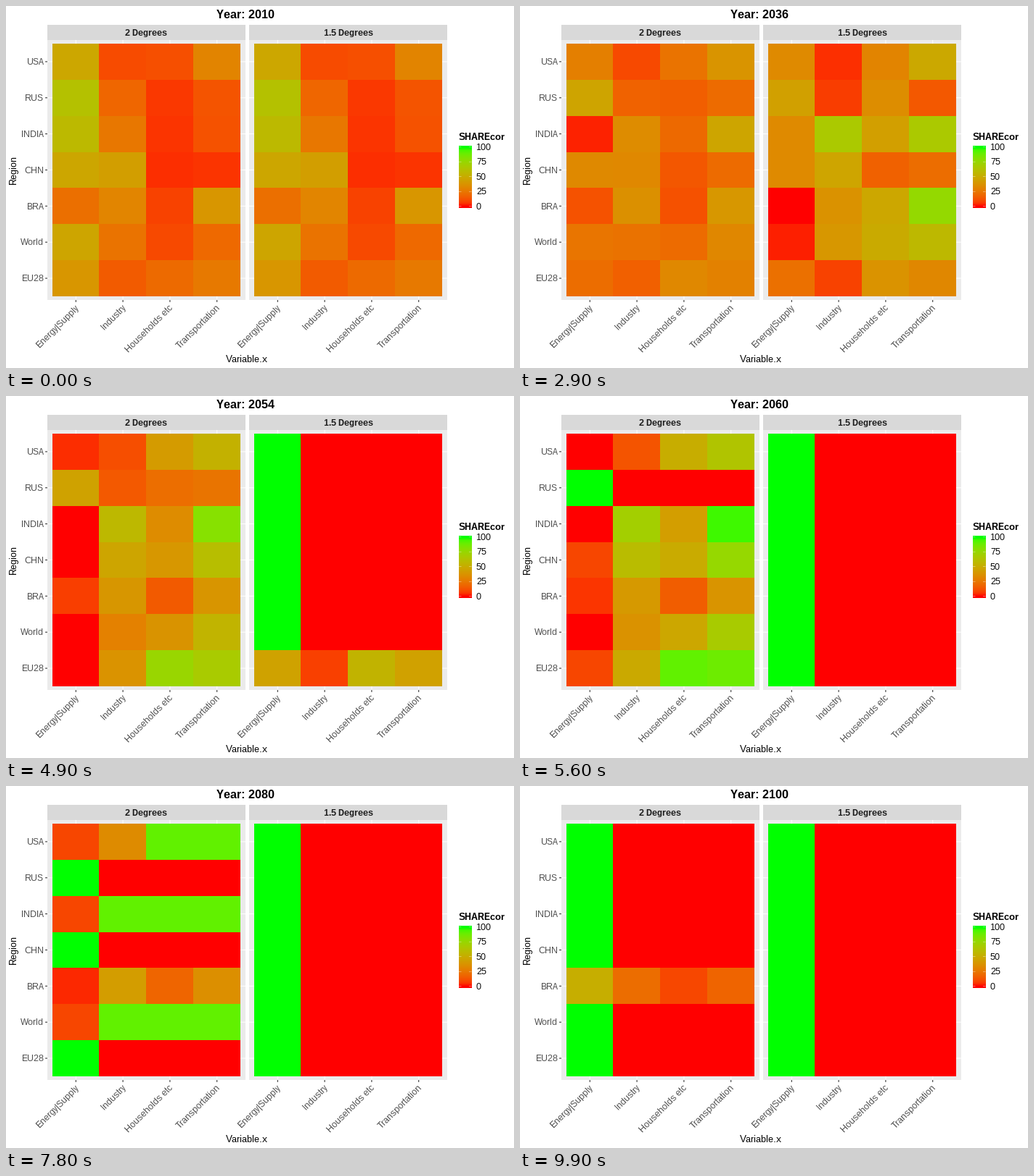
Recreate the animation shown at these times as a matplotlib script. Size 700 px wide and 500 px high, loop 10 s.

```python
import numpy as np
import matplotlib.pyplot as plt
from matplotlib.animation import FuncAnimation
from matplotlib.patches import Rectangle

W, H, DPI = 700, 500, 100
FRAMES, INTERVAL = 100, 100
PX = 72 / DPI  # points per pixel

plt.rcParams.update({
    "font.family": "Liberation Sans",
    "text.hinting": "default",
    "text.hinting_factor": 1,
    "text.kerning_factor": 6,
})

SECTORS = ["Energy|Supply", "Industry", "Households etc", "Transportation"]
PANEL_X = {"2 Degrees": 57, "1.5 Degrees": 335}
COL_W, ROW_H = 64.8, 49.86
ROW_EDGES = np.round(52 + ROW_H * np.arange(8))
ROW_MID = 76.9 + ROW_H * np.arange(7)

# Years with data and where they fall on the time line
YEARS = [*range(2010, 2050, 5), *range(2050, 2101, 10)]
KEYS = [0, 5, 11, 16, 22, 27, 33, 39, 44, *range(55, 100, 11)]

# Sector shares in 2010
START = {
    "USA": (47, 10, 11, 30),
    "RUS": (63, 19, 6, 13),
    "INDIA": (57, 25, 5, 12),
    "CHN": (47, 43, 4, 5),
    "BRA": (22, 31, 8, 39),
    "World": (48, 24, 10, 20),
    "EU28": (39, 15, 20, 26),
}
# Year of carbon-neutral supply, curve power, then the industry and
# household parts of demand in that year (and a late rebound of supply)
PATHS = {
    "2 Degrees": {
        "USA": (2053, 1.2, 0.10, 0.40),
        "RUS": (2049, 2, 0.24, 0.36),
        "INDIA": (2036.4, 0.5, 0.33, 0.20),
        "CHN": (2050, 2, 0.32, 0.27),
        "BRA": (2080, 0.7, 0.44, 0.19, 1.13),
        "World": (2049, 1.2, 0.24, 0.31),
        "EU28": (2045.5, 2, 0.20, 0.44),
    },
    "1.5 Degrees": {
        "USA": (2033.4, 3, 0.05, 0.37),
        "RUS": (2043.8, 3, 0.03, 0.74),
        "INDIA": (2032, 3, 0.38, 0.24),
        "CHN": (2033.3, 3, 0.55, 0.20),
        "BRA": (2030.5, 3, 0.22, 0.28),
        "World": (2035.3, 3, 0.27, 0.34),
        "EU28": (2043, 3, 0.07, 0.52),
    },
}


def shares(year, start, neutral, power, industry, homes, rebound=0):
    """Sector shares of net emissions; all supply once the net is negative."""
    supply, demand = start[0], np.array(start[1:])
    x = (year - 2010) / (neutral - 2010)
    ratio = supply / demand.sum() * (1 - x ** power)
    ratio += rebound * max(0, (year - 2080) / 20)
    if ratio <= -1:
        return np.array([100, 0, 0, 0])
    first = demand / demand.sum()
    last = np.array([industry, homes, 1 - industry - homes])
    mix = first + (last - first) * min(x, 1)
    return np.clip(100 * np.array([ratio, *mix]) / (1 + ratio), 0, 100)


def ramp(share):
    """Red to green through CIE Lab for shares of 0..100."""
    t = np.asarray(share, float)[..., None] / 100
    lab = (1 - t) * [53.24, 80.09, 67.20] + t * [87.73, -86.18, 83.18]
    fy = (lab[..., 0] + 16) / 116
    f = np.stack([fy + lab[..., 1] / 500, fy, fy - lab[..., 2] / 200], -1)
    xyz = np.where(f > 6 / 29, f ** 3, (f - 4 / 29) * 0.12842)
    xyz = xyz * [0.95047, 1, 1.08883]
    to_rgb = np.array([[3.2406, -1.5372, -0.4986],
                       [-0.9689, 1.8758, 0.0415],
                       [0.0557, -0.2040, 1.0570]])
    lin = np.clip(xyz @ to_rgb.T, 0, 1)
    rgb = np.where(lin > 0.0031308, 1.055 * lin ** (1 / 2.4) - 0.055, 12.92 * lin)
    return np.clip(rgb, 0, 1)


TABLES = {panel: np.array([[shares(y, START[r], *path) for r, path in paths.items()]
                           for y in YEARS])
          for panel, paths in PATHS.items()}


def tiles(panel, i):
    """Tile colours, moving linearly between the data years."""
    k = min(np.searchsorted(KEYS, i, side="right") - 1, len(KEYS) - 2)
    t = (i - KEYS[k]) / (KEYS[k + 1] - KEYS[k])
    table = TABLES[panel]
    return ramp(table[k] + (table[k + 1] - table[k]) * t)


fig = plt.figure(figsize=(W / DPI, H / DPI), dpi=DPI, facecolor="white")
ax = fig.add_axes([0, 0, 1, 1])
ax.axis("off")


def box(x, y, w, h, color):
    ax.add_patch(Rectangle((x, y), w, h, fc=color, lw=0, antialiased=False))


def line(x0, y0, x1, y1, color, width=1.07, z=2):
    ax.plot([x0, x1], [y0, y1], color=color, lw=width * PX,
            solid_capstyle="butt", snap=False, zorder=z)


def label(x, y, s, size=12, color="black", **kw):
    kw.setdefault("va", "baseline")
    return ax.text(x, y, s, fontsize=size * PX, color=color, **kw)


# Panels
meshes = {}
for panel, x in PANEL_X.items():
    box(x, 26, 273, 21, "#D9D9D9")
    box(x, 47, 273, 359, "#EBEBEB")
    label(x + 136.5, 41, panel, color="#1A1A1A", weight="bold", ha="center")
    for y in ROW_MID:
        line(x, y, x + 273, y, "white")
    for k, name in enumerate(SECTORS):
        cx = x + 39.3 + COL_W * k
        line(cx, 47, cx, 406, "white")
        line(cx, 406, cx, 409, "#333333")
        label(cx + 6.5, 411, name, color="#4D4D4D", rotation=45,
              ha="right", va="top")
    col_edges = np.round(x + 6.7 + COL_W * np.arange(5))
    meshes[panel] = ax.pcolormesh(col_edges, ROW_EDGES, tiles(panel, 0),
                                  antialiased=False, linewidth=0, zorder=3)

# Axis labels
for y, region in zip(ROW_MID, START):
    line(54, y, 57, y, "#333333")
    label(52, y + 4.2, region, color="#4D4D4D", ha="right")
label(332, 492, "Variable.x", 13, ha="center")
label(10, 225.5, "Region", 13, rotation=90, ha="center", va="center")

# Colour bar
label(624, 185, "SHAREcor", 13, weight="bold")
ax.imshow(ramp(np.linspace(100, 0, 20))[:, None], aspect="auto",
          extent=(624, 642, 279, 193), interpolation="bilinear", zorder=2)
for v in range(0, 101, 25):
    y = 276.7 - 0.821 * v
    line(624, y, 627.5, y, "white", 0.375, 4)
    line(638, y, 641.5, y, "white", 0.375, 4)
    label(648, y + 4.2, str(v))

title = label(290, 17, "Year: 2010", 16, weight="bold")
ax.set_xlim(0, W)
ax.set_ylim(H, 0)


def update(i):
    title.set_text(f"Year: {2010 + i * 10 // 11}")
    for panel, mesh in meshes.items():
        mesh.set_array(tiles(panel, i))
    return [title, *meshes.values()]


anim = FuncAnimation(fig, update, frames=FRAMES, interval=INTERVAL,
                     repeat=True, repeat_delay=0)
plt.show()
```
